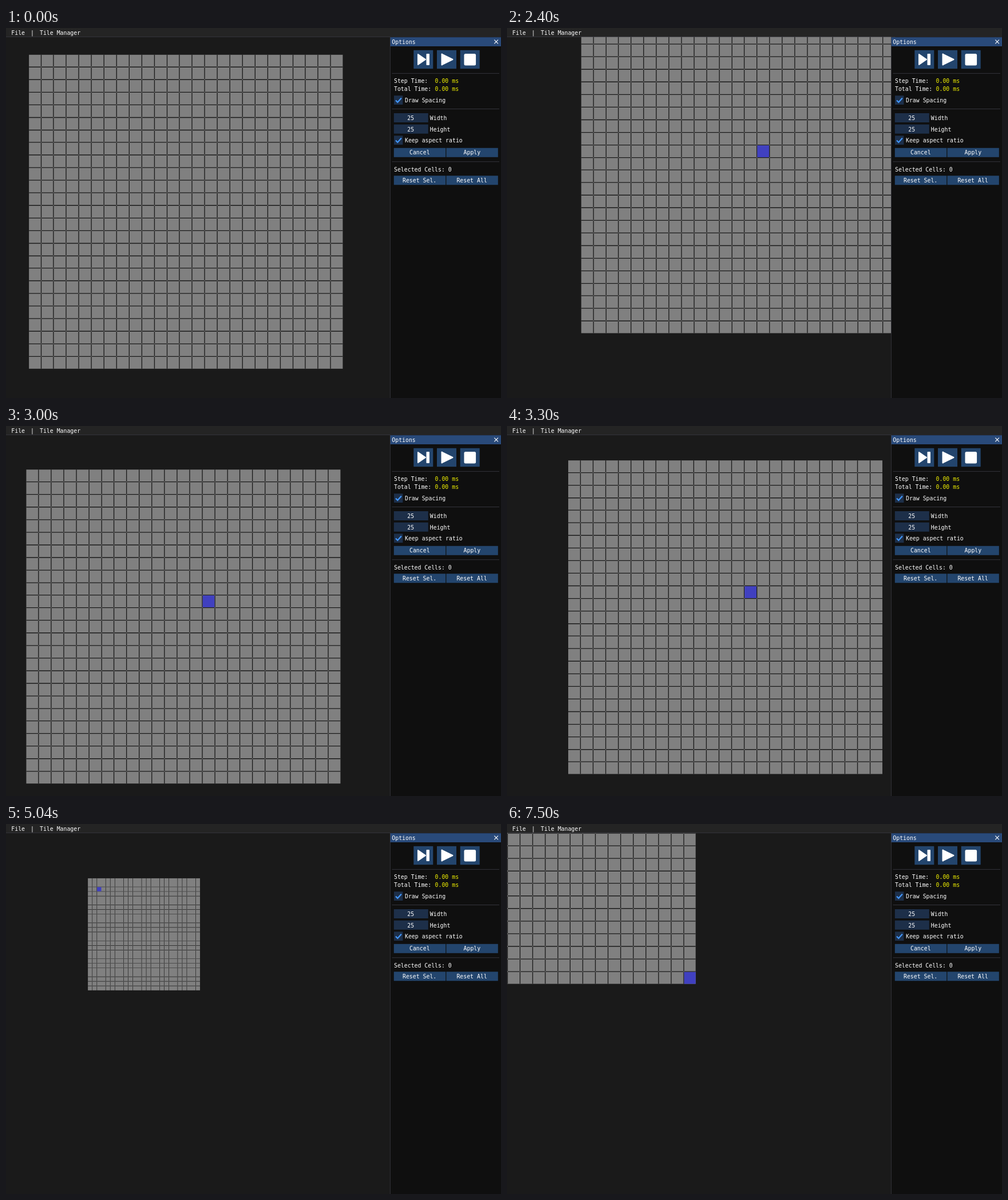
These frames come from a looping animation (865 by 647 pixels, 8000 ms). An HTML page:

```html
<!DOCTYPE html>
<html lang="en">
<head>
<meta charset="utf-8">
<title>Tile grid</title>
<style>
  html, body { margin: 0; width: 100%; height: 100%; overflow: hidden; background: #1a1a1a; }
  svg { display: block; width: 865px; height: 647px; }
  text { font: 9.85px "DejaVu Sans Mono", "Liberation Mono", monospace; fill: #fff; white-space: pre; }
  .time { fill: #f0f000; }
  .button { fill: #23456d; }
  .field { fill: #1d2f49; }
  .line { fill: #3e3e47; }
  .check { fill: none; stroke: #4296fa; stroke-width: 2.2; }
  .icon { fill: #fff; stroke: #fff; stroke-width: 2; stroke-linejoin: round; }
</style>
</head>
<body>
<svg viewBox="0 0 865 647">
  <rect width="865" height="647" fill="#1a1a1a"/>
  <rect id="board" fill="#808080"/>
  <path id="gaps" fill="#1a1a1a"/>
  <rect id="hover" fill="#4040c0"/>
  <rect width="865" height="15.4" fill="#242424"/>
  <rect class="line" y="15" width="865" height="0.7"/>
  <rect x="671" y="15.6" width="194" height="632" fill="#0f0f0f"/>
  <rect x="671" y="16.2" width="194" height="15.8" fill="#294a7a"/>
  <rect class="line" x="671" y="15.6" width="0.7" height="632"/>
  <path d="M853.3 20.7l6.6 6.6M859.9 20.7l-6.6 6.6" stroke="#fff" stroke-width="1.1"/>
  <g id="panel"></g>
</svg>
<script>
const LOOP = 8000, STEP = 60, COUNT = 25, PITCH = 22;
const DENSITY = 1.49546;          // device pixels per stage pixel
const GAP = 2 / DENSITY;
const $ = id => document.getElementById(id);
const set = (el, attrs) => { for (const k in attrs) el.setAttribute(k, attrs[k]); };

function add(tag, attrs, text) {
  const el = document.createElementNS("http://www.w3.org/2000/svg", tag);
  set(el, attrs);
  if (text) el.textContent = text;
  $("panel").append(el);
}
const box = (cls, x, y, width, height) => add("rect", { class: cls, x, y, width, height });
const label = (x, y, text, cls = "") => add("text", { x, y, class: cls }, text);
function button(x, y, width, textX, text) {
  box("button", x, y, width, 16);
  label(textX, y + 11.6, text);
}
function checkbox(y, text) {
  box("field", 678, y, 15.4, 15.8);
  add("path", { class: "check", d: `M681 ${y + 8.2}l3.3 3.4 6.6-7.4` });
  label(697, y + 11.8, text);
}
function field(y, text) {
  box("field", 677.8, y, 60, 16);
  label(701.3, y + 11.8, "25");
  label(740.8, y + 11.8, text);
}

function buildPanel() {
  label(9.3, 12, "File");
  label(43, 12, "|");
  label(59, 12, "Tile Manager");
  label(674.3, 28, "Options");
  for (const x of [712.3, 753, 793.7]) box("button", x, 38.8, 34, 32.4);
  add("path", { class: "icon", d: "M720 46V64L733 55ZM735.5 46h3.5v18h-3.5z" });
  add("path", { class: "icon", d: "M761.5 45.5V64.5L780.5 55Z" });
  add("rect", { class: "icon", x: 801.5, y: 46, width: 18.6, height: 18.4, rx: 1.5 });
  for (const y of [78.9, 141.2, 233.4]) box("line", 674.5, y, 187.5, 0.8);
  label(678, 95.7, "Step Time:");
  label(678, 110.2, "Total Time:");
  label(749.6, 95.7, "0.00 ms", "time");
  label(749.6, 110.2, "0.00 ms", "time");
  checkbox(118.2, "Draw Spacing");
  field(149, "Width");
  field(168.7, "Height");
  checkbox(188.3, "Keep aspect ratio");
  button(677.8, 209.8, 90.4, 705, "Cancel");
  button(769.4, 209.8, 90.4, 799.6, "Apply");
  label(678, 250.6, "Selected Cells: 0");
  button(677.8, 258.3, 90.4, 693, "Reset Sel.");
  button(769.4, 258.3, 90.4, 787.4, "Reset All");
}

// [time, column, row]; no cell means the pointer is off the tiles
const HOVERS = [
  [0], [300, 21, 8], [360, 19, 8], [420, 17, 9], [480, 16, 9], [540, 15, 10], [600, 14, 10],
  [1200, 12, 10], [1260, 9, 11], [1320, 8, 11],
  [1500, 9, 11], [1560, 11, 11], [1620, 13, 10], [1680, 14, 10],
  [3420, 13, 9], [3540, 10, 7], [3600, 6, 5], [3660, 3, 3], [3720, 2, 2], [3780], [4020, 2, 2],
  [5880, 5, 4], [5940, 11, 9], [6000, 18, 15], [6060, 24, 22], [6120],
  [6360, 23, 24], [6540, 24, 24]
];
// [time, camera distance]
const ZOOMS = [
  [0, 1], [4620, 1.3], [4680, 1.6], [4740, 1.9], [4860, 2.2], [4920, 2.5], [5040, 2.8],
  [5400, 3.1], [6840, 2.8], [6900, 2.5], [7020, 2.2], [7380, 1.9], [7440, 1.3], [7500, 1]
];
const DRAG = { start: 2100, end: 3300, step: 110, points: [
  [49, 46.9], [88, 40], [120, 12], [130, -24], [117, -46], [90, -36],
  [62.5, -2.1], [36, 44], [33, 74], [57, 78], [92, 68], [107.1, 60.1]
] };
const ZOOM_OUT = { base: [107.1, 60.1], pivot: [163.27, 113.9] };
const ZOOM_IN = { base: [-218.7, -269.4], pivot: [318.4, 270.83] };

const latest = (list, t) => list.findLast(item => item[0] <= t);

function spline(points, u) {
  const i = Math.floor(u), f = u - i;
  const at = k => points[Math.max(0, Math.min(points.length - 1, k))];
  const [a, b, c, d] = [at(i - 1), at(i), at(i + 1), at(i + 2)];
  return [0, 1].map(k => b[k] + f / 2 * (c[k] - a[k]
    + f * (2 * a[k] - 5 * b[k] + 4 * c[k] - d[k]
    + f * (3 * (b[k] - c[k]) + d[k] - a[k]))));
}

function origin(t, zoom) {
  if (t < DRAG.start) return [39.9, 46.9];
  if (t < DRAG.end) return spline(DRAG.points, (t - DRAG.start) / DRAG.step);
  const { base, pivot } = t < 6840 ? ZOOM_OUT : ZOOM_IN;
  return base.map((b, k) => pivot[k] + (b - pivot[k]) / zoom);
}

const snap = v => Math.round(v * DENSITY) / DENSITY;

function draw(t) {
  const zoom = latest(ZOOMS, t)[1];
  const pitch = PITCH / zoom, gap = GAP / zoom;
  const start = origin(t, zoom);
  const near = (axis, i) => snap(start[axis] + pitch * i);
  const far = (axis, i) => snap(start[axis] + pitch * (i + 1) - gap);
  const area = (c0, r0, c1, r1) => {
    const x = near(0, c0), y = near(1, r0);
    return { x, y, width: far(0, c1) - x, height: far(1, r1) - y };
  };

  const board = area(0, 0, COUNT - 1, COUNT - 1);
  set($("board"), board);
  let d = "";
  for (let i = 1; i < COUNT; i++) {
    const x0 = far(0, i - 1), x1 = near(0, i), y0 = far(1, i - 1), y1 = near(1, i);
    if (x1 > x0) d += `M${x0} ${board.y}H${x1}v${board.height}H${x0}z`;
    if (y1 > y0) d += `M${board.x} ${y0}V${y1}h${board.width}V${y0}z`;
  }
  set($("gaps"), { d });

  const [, col, row] = latest(HOVERS, t);
  const shown = col !== undefined;
  set($("hover"), shown ? area(col, row, col, row) : { width: 0, height: 0 });
}

let last = -1;
function tick() {
  const t = Math.floor(performance.now() % LOOP / STEP) * STEP;
  if (t !== last) draw(last = t);
  requestAnimationFrame(tick);
}
buildPanel();
tick();
</script>
</body>
</html>
```
